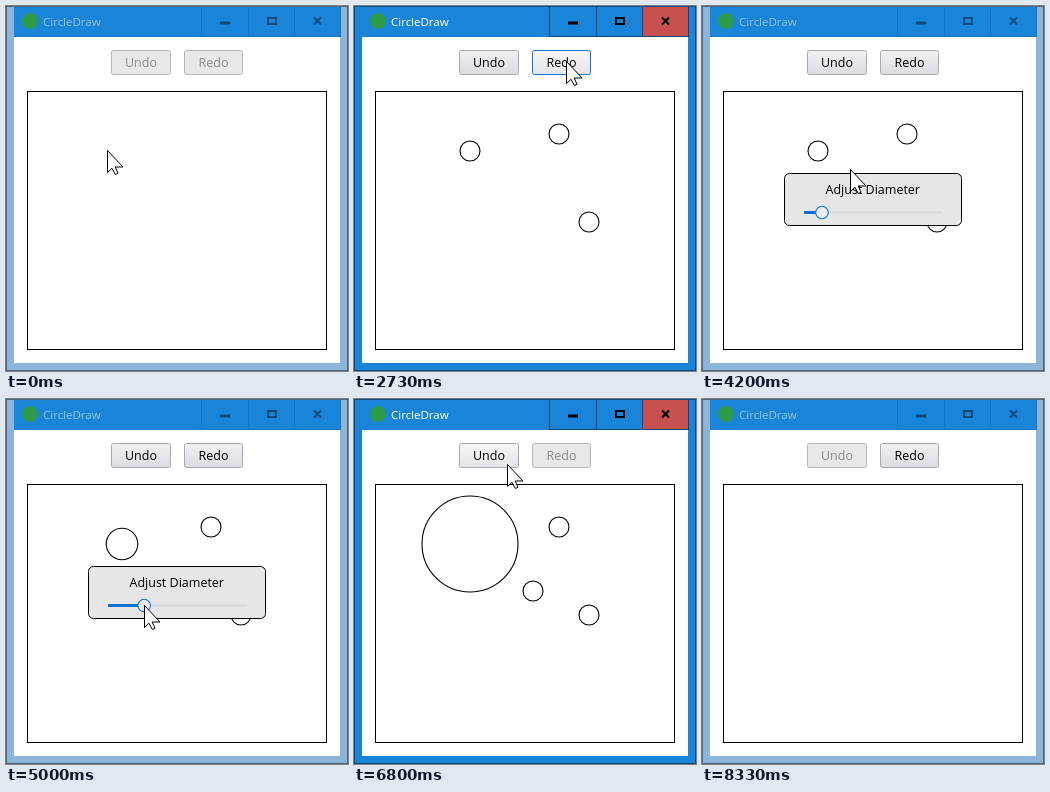
An HTML page that plays this animation: 342 by 365 pixels, repeating every 8470 ms.

```html
<!DOCTYPE html>
<html lang="en">
<head>
<meta charset="utf-8">
<title>CircleDraw</title>
<style>
html, body { margin: 0; width: 100%; height: 100%; overflow: hidden; background: #fff; }
svg { display: block; }
text { font-family: "Open Sans", "Noto Sans", sans-serif; font-size: 12.5px; }
.crisp { shape-rendering: crispEdges; }
</style>
</head>
<body>
<svg id="stage" width="342" height="365" viewBox="0 0 342 365">
  <defs>
    <linearGradient id="idle" x2="0" y2="1"><stop stop-color="#f1f1f4"/><stop offset="1" stop-color="#dbdbe1"/></linearGradient>
    <linearGradient id="hover" x2="0" y2="1"><stop stop-color="#f7f7f9"/><stop offset="1" stop-color="#e4e4e9"/></linearGradient>
    <filter id="shadow" x="-20%" y="-60%" width="140%" height="220%"><feGaussianBlur stdDeviation="3.5"/></filter>
  </defs>

  <rect id="frame" x=".5" y=".5" width="341" height="364"/>
  <rect x="8" y="1" width="326" height="30" fill="#1a84d9"/>
  <rect x="8" y="31" width="326" height="326" fill="#fff"/>
  <circle cx="24" cy="15" r="8" fill="#2c9a4b"/>
  <text id="title" x="37" y="20" style="font-size:11.5px">CircleDraw</text>
  <rect id="close" class="crisp" x="289" y="1" width="45" height="29" fill="#c75050"/>
  <path id="dividers" class="crisp" d="M195.5 1V30.5H334.5V1M242.5 1V30M288.5 1V30" fill="none"/>
  <g id="glyphs" fill="none" stroke-width="2">
    <path d="M214 17H224" stroke-width="3"/>
    <rect x="262" y="12" width="8" height="6"/>
    <path d="M308 11.5L315 18.5M315 11.5L308 18.5"/>
  </g>

  <g id="buttons"></g>
  <rect x="21.5" y="85.5" width="299" height="258" fill="#fff" stroke="#000" class="crisp"/>
  <g id="circles" stroke="#000" stroke-width="1.1"></g>

  <g id="menu">
    <rect x="116" y="145" width="105" height="26" fill="#000" opacity=".35" filter="url(#shadow)"/>
    <rect x="116" y="145" width="105" height="26" fill="#f0f0f0"/>
    <rect id="menuItem" x="117" y="146" width="103" height="24" fill="#0a78d4"/>
    <text id="menuText" x="121" y="162.5">Adjust Diameter</text>
  </g>

  <g id="dialog">
    <rect x="82.5" y="167.5" width="177" height="52" rx="5" fill="#e6e6e6" stroke="#000"/>
    <text x="123.5" y="188">Adjust Diameter</text>
    <path d="M102 206.5H241" stroke="#dcdce0" stroke-width="3"/>
    <path id="track" stroke="#0a74d4" stroke-width="3"/>
    <circle id="thumb" cy="206.5" r="6.3" fill="#ebebec" stroke="#0a74d4" stroke-width="1.1"/>
  </g>

  <path id="cursor" d="M.5 .5V22.5L5 18.3L8.3 24.5L11 23.2L8.2 17H16Z" fill="#fff" stroke="#000"/>
</svg>
<script>
const LOOP = 8470;
const $ = id => document.getElementById(id);
const within = (t, ...spans) => spans.some(([from, to]) => t >= from && t < to);
const show = (node, on) => node.setAttribute("display", on ? "inline" : "none");

function add(parent, tag, attrs, text = "") {
  const node = document.createElementNS("http://www.w3.org/2000/svg", tag);
  set(node, attrs);
  node.textContent = text;
  return parent.appendChild(node);
}
function set(node, attrs) {
  for (const key in attrs) node.setAttribute(key, attrs[key]);
}

// time, x, y of the pointer tip
const path = [
  [130, 101, 144], [230, 116, 145], [300, 116, 145], [560, 205, 128], [640, 205, 128],
  [900, 235, 216], [1000, 235, 216], [1230, 84, 237], [1300, 84, 237], [1470, 108, 116],
  [1650, 134, 60], [2200, 134, 60], [2560, 212, 55], [2800, 212, 55], [3130, 127, 134],
  [3200, 127, 134], [3500, 116, 145], [3740, 116, 145], [3870, 134, 154], [4010, 134, 154],
  [4130, 148, 163], [4330, 148, 163], [4700, 120, 206], [4870, 120, 206], [5430, 251, 207],
  [5530, 251, 207], [5860, 149, 247], [6030, 149, 247], [6270, 179, 192], [6350, 179, 192],
  [6660, 153, 65], [7960, 153, 65], [8190, 150, -30]
];
function pointer(t) {
  const i = path.findIndex(p => p[0] > t);
  if (i === 0) return path[0].slice(1);
  if (i < 0) return path[path.length - 1].slice(1);
  const [a, b] = [path[i - 1], path[i]];
  const u = (t - a[0]) / (b[0] - a[0]);
  const k = u * u * (3 - 2 * u);
  return [a[1] + (b[1] - a[1]) * k, a[2] + (b[2] - a[2]) * k];
}

const circles = [
  { x: 116, y: 145, spans: [[265, 7930]], adjustable: true },
  { x: 205, y: 128, spans: [[600, 7665]] },
  { x: 235, y: 216, spans: [[930, 2130], [2725, 7400]] },
  { x: 84, y: 237, spans: [[1265, 1865]] },
  { x: 179, y: 192, spans: [[6330, 6925]] }
].map(c => ({ ...c, node: add($("circles"), "circle", { cx: c.x, cy: c.y }) }));

const buttons = [
  { label: "Undo", x: 105, width: 60, enabled: [[265, 7930]], focus: [[1800, 2665], [6865, 7930]],
    pressed: [1800, 2065, 6865, 7065, 7335, 7600, 7865] },
  { label: "Redo", x: 178, width: 59, enabled: [[1865, 6000], [6925, LOOP]], focus: [[2665, 3520]],
    pressed: [2665] }
].map(b => ({
  ...b,
  box: add($("buttons"), "rect", { x: b.x + .5, y: 44.5, width: b.width - 1, height: 24, rx: 2 }),
  text: add($("buttons"), "text", { x: b.x + b.width / 2, y: 61, "text-anchor": "middle" }, b.label)
}));

function drawWindow(active) {
  set($("frame"), { fill: active ? "#1a84d9" : "#8db5da", stroke: active ? "#0f4a78" : "#506477" });
  set($("title"), { fill: active ? "#fff" : "#8fc1e8" });
  set($("dividers"), { stroke: active ? "#0e4673" : "#1674c0" });
  set($("glyphs"), { stroke: active ? "#000" : "#0f4c7d" });
  show($("close"), active);
}

function drawButton(b, t, x, y, active) {
  const enabled = within(t, ...b.enabled);
  const hover = active && x >= b.x && x < b.x + b.width && y >= 44 && y < 69;
  const pressed = b.pressed.some(p => within(t, [p, p + 62]));
  const focused = active && within(t, ...b.focus);
  set(b.box, {
    fill: !enabled ? "#e8e8e8" : pressed ? "#d0d0d8" : hover ? "url(#hover)" : "url(#idle)",
    stroke: focused ? "#0a78d4" : enabled ? "#a8a8b2" : "#b5b5ba"
  });
  set(b.text, { fill: enabled ? "#000" : "#8b8b8b" });
}

function render(t) {
  const [x, y] = pointer(t);
  const active = within(t, [200, 4130], [6000, 8200]);
  drawWindow(active);
  buttons.forEach(b => drawButton(b, t, x, y, active));

  const thumb = t < 4870 ? 120 : Math.min(240, Math.max(120, x));
  const slide = t > 5430 ? 240 : thumb;
  const adjusted = t < 7130 ? 10 + 38 * (slide - 120) / 120 : 10;
  for (const c of circles) {
    const r = c.adjustable ? adjusted : 10;
    const selected = c.adjustable && within(t, [3270, 4130]) && Math.hypot(x - c.x, y - c.y) < r;
    show(c.node, within(t, ...c.spans));
    set(c.node, { r, fill: selected || (c.adjustable && within(t, [3730, 4130])) ? "#d3d3d3" : "#fff" });
    if (!selected && !within(t, [3730, 4130])) c.node.setAttribute("fill", "none");
  }

  const picked = t >= 3800;
  show($("menu"), within(t, [3725, 4130]));
  show($("menuItem"), picked);
  set($("menuText"), { fill: picked ? "#fff" : "#000" });

  show($("dialog"), within(t, [4130, 6000]));
  set($("track"), { d: `M102 206.5H${slide}` });
  set($("thumb"), { cx: slide });
  set($("cursor"), { transform: `translate(${Math.round(x)} ${Math.round(y)})` });
}

const start = performance.now();
function tick() {
  render((performance.now() - start) % LOOP);
  requestAnimationFrame(tick);
}
tick();
</script>
</body>
</html>
```
